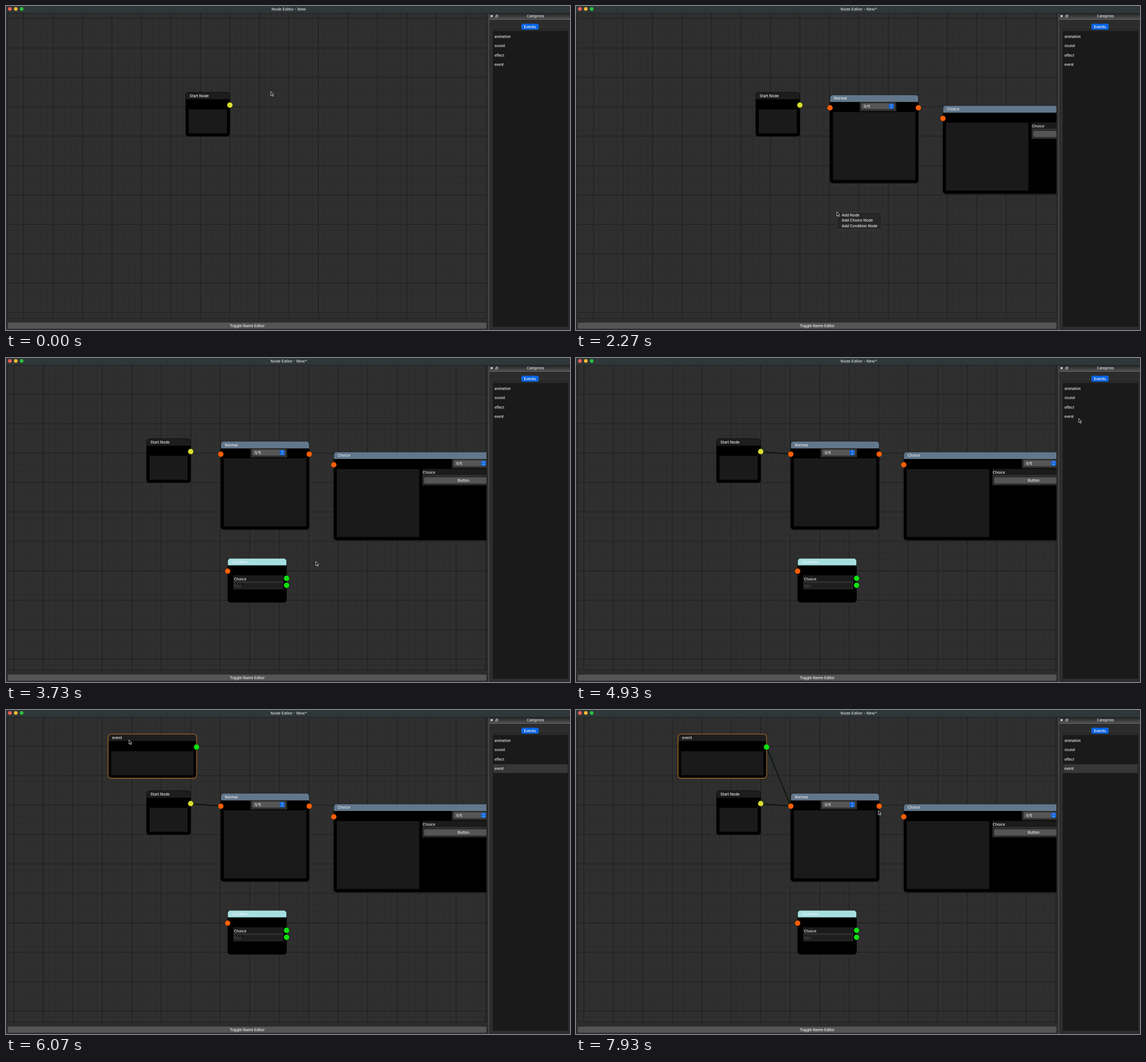
Write an HTML page with a canvas that moves like this. It is 986 by 568 pixels and loops after 8 s.

```html
<!DOCTYPE html>
<html lang="en">
<head>
<meta charset="utf-8">
<title>Node Editor</title>
<style>
  html, body { margin: 0; width: 100%; height: 100%; overflow: hidden; background: #2d2d2d; }
  canvas { display: block; width: 986px; height: 568px; }
</style>
</head>
<body>
<canvas id="stage"></canvas>
<script>
const W = 986, H = 568, LOOP = 8000;
const canvas = document.getElementById('stage');
const ctx = canvas.getContext('2d');
const dpr = window.devicePixelRatio || 1;
canvas.width = W * dpr;
canvas.height = H * dpr;

const SANS = 'Inter, "Noto Sans", sans-serif';
const HANGUL = '"Noto Sans CJK KR", "Noto Sans CJK", sans-serif';
const ORANGE = '#ff5f05', GREEN = '#0fe30f', YELLOW = '#d8df2c';
const SLATE = '#62778b', CYAN = '#a6dfe1', DARK = '#1d1d1d', FIELD = '#1a1a1a';
const MENU_ITEMS = ['Add Node', 'Add Choice Node', 'Add Condition Node'];

// Event times in ms
const T = {
  normal: 720, choice: 1560, condition: 2620,
  grab: 2940, release: 3620,
  link1: 4060, linked1: 4330,
  pick: 5230, drop: 5800, select: 5960,
  link2: 6560, linked2: 7130
};

// Rows of [time, x, y]; motion eases between them
const cursorPath = [
  [0, 463, 150], [270, 444, 156], [400, 444, 156], [600, 464, 162], [780, 464, 162],
  [1130, 641, 174.5], [1210, 641, 174.5], [1330, 662.5, 187], [1440, 668, 190], [1700, 668, 190],
  [2180, 456, 361], [2290, 456, 361], [2480, 480, 385], [2640, 480, 385],
  [2880, 657, 408], [2940, 657, 408], [3130, 629.7, 401.8], [3540, 588.5, 398], [3640, 588.5, 398],
  [3980, 323, 164], [4060, 323, 164], [4300, 375.5, 168.5], [4400, 375.5, 168.5],
  [4860, 879, 106], [5060, 879, 106], [5180, 866, 103], [5260, 866, 103],
  [5760, 178.5, 42.3], [5840, 178.5, 42.3], [6000, 215, 52.5], [6180, 215, 52.5],
  [6480, 333, 65], [6570, 333, 65], [7040, 375.5, 168.5], [7200, 375.5, 168.5],
  [7780, 528, 176], [8000, 528.5, 176.5]
];
const panPath = [[2940, 0, 0], [3130, -27.3, -6.2], [3540, -68.5, -9.8]];
const menus = [
  { x: 444, y: 156, from: 330, to: 680, rows: [[540, 0]] },
  { x: 641, y: 174.5, from: 1190, to: 1520, rows: [[1270, 0], [1390, 1]] },
  { x: 455.5, y: 360.8, from: 2230, to: 2580, rows: [[2350, 0], [2400, 1], [2440, 2]] }
];

function along(path, t) {
  if (t <= path[0][0]) return path[0].slice(1);
  for (let i = 1; i < path.length; i++) {
    const [t1, x1, y1] = path[i];
    if (t > t1) continue;
    const [t0, x0, y0] = path[i - 1];
    const u = (t - t0) / (t1 - t0), k = u * u * (3 - 2 * u);
    return [x0 + (x1 - x0) * k, y0 + (y1 - y0) * k];
  }
  return path[path.length - 1].slice(1);
}

function rect(x, y, w, h, fill, r = 0) {
  ctx.beginPath();
  ctx.roundRect(x, y, w, h, r);
  ctx.fillStyle = fill;
  ctx.fill();
}

function frame(x, y, w, h, color, width = 1, r = 0) {
  ctx.beginPath();
  ctx.roundRect(x, y, w, h, r);
  ctx.strokeStyle = color;
  ctx.lineWidth = width;
  ctx.stroke();
}

function dot(x, y, r, fill) {
  ctx.beginPath();
  ctx.arc(x, y, r, 0, Math.PI * 2);
  ctx.fillStyle = fill;
  ctx.fill();
}

function line(points, color, width) {
  ctx.beginPath();
  points.forEach(([x, y]) => ctx.lineTo(x, y));
  ctx.strokeStyle = color;
  ctx.lineWidth = width;
  ctx.stroke();
}

// y is the middle of the capitals
function text(str, x, y, { size = 6.5, weight = 500, color = '#f0f0f0', align = 'left', font = SANS } = {}) {
  ctx.font = `${weight} ${size}px ${font}`;
  ctx.textAlign = align;
  ctx.fillStyle = color;
  ctx.fillText(str, x, y + size * 0.36);
}

function gridLines(step, ox, oy, color, width) {
  ctx.beginPath();
  for (let x = ox % step; x < 842; x += step) { ctx.moveTo(x, 13); ctx.lineTo(x, 547); }
  for (let y = oy % step; y < 548; y += step) { ctx.moveTo(3, y); ctx.lineTo(840, y); }
  ctx.strokeStyle = color;
  ctx.lineWidth = width;
  ctx.stroke();
}

function socket(x, y, color) {
  dot(x, y, 5.1, 'rgba(0,0,0,.55)');
  dot(x, y, 4.7, color);
}

function nodeBox(x, y, w, h, title, color, selected) {
  rect(x, y, w, h, '#000', 5);
  rect(x, y, w, 12.3, color, [5, 5, 0, 0]);
  frame(x, y, w, h, selected ? '#b96f25' : 'rgba(0,0,0,.8)', selected ? 1.1 : 0.6, 5);
  text(title, x + 7, y + 6.2);
}

function combo(x, y) {
  rect(x, y, 64, 16.2, '#2d2d2d');
  rect(x + 3, y + 2.2, 58, 10.4, '#565656', 2.5);
  text('독백', x + 6.8, y + 7.3, { size: 6.2, weight: 400, font: HANGUL });
  rect(x + 51, y + 2.8, 8.6, 9.2, '#0b63dc', 2);
  const cx = x + 55.3, cy = y + 7.4;
  line([[cx - 1.7, cy - 1.1], [cx, cy - 2.8], [cx + 1.7, cy - 1.1]], '#fff', 0.8);
  line([[cx - 1.7, cy + 1.1], [cx, cy + 2.8], [cx + 1.7, cy + 1.1]], '#fff', 0.8);
}

function startNode(x, y) {
  nodeBox(x, y, 77.3, 77.3, 'Start Node', DARK);
  rect(x + 5.3, y + 30, 66.7, 42, FIELD);
  socket(x + 77.3, y + 22.6, YELLOW);
}

function normalNode(x, y) {
  nodeBox(x, y, 154.6, 154.6, 'Normal', SLATE);
  rect(x + 5.3, y + 30, 144, 119, FIELD);
  combo(x + 52, y + 12.3);
  socket(x, y + 22.5, ORANGE);
  socket(x + 154.6, y + 22.5, ORANGE);
}

function choiceNode(x, y) {
  nodeBox(x, y, 309, 154.6, 'Choice', SLATE);
  rect(x + 5.3, y + 30, 144, 119, FIELD);
  combo(x + 206.6, y + 12.3);
  rect(x + 155, y + 30, 149, 28.5, '#2b2b2b');
  rect(x + 155, y + 30, 149, 10.8, '#1b1b1b');
  line([[x + 155, y + 41], [x + 304, y + 41]], '#424242', 0.7);
  text('Choice', x + 155.6, y + 36);
  rect(x + 158, y + 44.5, 138, 10.6, '#555', 2);
  text('Button', x + 227, y + 49.8, { align: 'center' });
  socket(x, y + 22.5, ORANGE);
}

function conditionNode(x, y) {
  nodeBox(x, y, 103, 77.3, 'Condition', CYAN);
  rect(x + 10, y + 30, 87.5, 24.2, '#2b2b2b');
  rect(x + 10, y + 30, 87.5, 10.6, '#1b1b1b');
  rect(x + 10, y + 43, 87.5, 10, '#1e1e1e');
  line([[x + 10, y + 41.4], [x + 97.5, y + 41.4]], '#424242', 0.7);
  text('Choice', x + 11, y + 36.2);
  text('Else', x + 11, y + 48.6, { color: '#505050' });
  socket(x, y + 22.5, ORANGE);
  socket(x + 103, y + 35, GREEN);
  socket(x + 103, y + 47.3, GREEN);
}

function eventNode(x, y, selected) {
  nodeBox(x, y, 154.6, 77.3, 'event', DARK, selected);
  rect(x + 5.3, y + 30, 144, 42, FIELD);
  socket(x + 154.6, y + 22.7, GREEN);
}

function edge(from, to) {
  line([from, to], '#071407', 1.7);
}

function drawMenu({ x, y, rows }, t) {
  rect(x, y, 79, 31.4, '#262626');
  frame(x + 0.3, y + 0.3, 78.4, 30.8, '#474747', 0.7);
  const active = rows.filter(([at]) => t >= at).pop();
  if (active) rect(x + 0.6, y + 1.4 + active[1] * 9.2, 78, 9.2, '#2e72bb');
  MENU_ITEMS.forEach((item, i) => text(item, x + 9, y + 6 + i * 9.2));
}

function drawScene(t, cursor) {
  const [px, py] = along(panPath, t);
  ctx.save();
  ctx.beginPath();
  ctx.rect(3, 13, 837, 534);
  ctx.clip();
  rect(3, 13, 837, 534, '#2f2f2f');
  const ox = 30.6 + px + 515.5, oy = 22 + py + 515.5;
  gridLines(10.31, ox, oy, '#2a2a2a', 0.6);
  gridLines(51.55, ox, oy, '#212121', 1.2);

  const out1 = [391.4 + px, 173.8 + py], in1 = [444 + px, 178.4 + py], out2 = [333.1, 65];
  if (t >= T.link1) edge(out1, t < T.linked1 ? cursor : in1);
  if (t >= T.link2) edge(out2, t < T.linked2 ? cursor : in1);

  startNode(314.1 + px, 151.2 + py);
  if (t >= T.normal) normalNode(444 + px, 155.9 + py);
  if (t >= T.choice) choiceNode(641.5 + px, 174.6 + py);
  if (t >= T.condition) conditionNode(456 + px, 361 + py);
  if (t >= T.drop) eventNode(178.5, 42.3, t >= T.select);
  ctx.restore();
  frame(2.7, 12.7, 837.6, 534.6, '#202020', 0.8);
}

function drawSidebar(t) {
  rect(843, 13, 1.6, 555, '#4c4c4c');
  const shade = ctx.createLinearGradient(0, 13, 0, 23);
  shade.addColorStop(0, '#242424');
  shade.addColorStop(1, '#505050');
  rect(845, 13, 141, 10.4, shade);
  rect(845, 23.2, 141, 0.8, '#777');
  line([[847.2, 15.8], [850.8, 19.4]], '#fff', 1.2);
  line([[850.8, 15.8], [847.2, 19.4]], '#fff', 1.2);
  frame(857.2, 15.7, 2.8, 2.8, '#ddd', 0.7);
  rect(855.8, 17, 2.9, 2.9, '#333');
  frame(855.8, 17, 2.9, 2.9, '#ddd', 0.7);
  text('Categories', 925.7, 18.3, { size: 5.7, align: 'center' });

  rect(849, 37, 135.5, 527, '#292929', 2);
  frame(849.3, 37.3, 135, 526.4, '#3b3b3b', 0.7, 2);
  rect(901, 31, 30.3, 10.6, '#0a64e0', 2.5);
  text('Events', 916, 36.5, { align: 'center', color: '#fff' });
  rect(851, 44, 132, 518.5, FIELD);
  if (t >= T.pick) rect(851.5, 95, 130.5, 15.6, '#373737');
  ['animation', 'sound', 'effect', 'event'].forEach((name, i) =>
    text(name, 854, 53.6 + i * 16.5, { size: 6.1 }));
}

function drawChrome(t) {
  rect(0, 0, W, 12.3, '#2f3739');
  rect(0, 12, W, 0.8, '#1f2223');
  ['#ff5f57', '#febc2e', '#28c840'].forEach((c, i) => dot(6.8 + i * 10.3, 5.2, 3.1, c));
  const title = 'Node Editor - New' + (t >= T.normal ? '*' : '');
  text(title, 494.3, 5.2, { size: 6.8, weight: 600, color: '#c9cccd', align: 'center' });
  rect(3, 555, 837, 10.8, '#555', 2);
  text('Toggle Name Editor', 421.7, 560.2, { align: 'center' });
}

function drawArrow([x, y]) {
  const shape = [[0, 0], [0, 7.2], [1.7, 5.7], [2.9, 8.3], [4.1, 7.7], [2.9, 5.3], [5.1, 5.2]];
  ctx.beginPath();
  shape.forEach(([dx, dy]) => ctx.lineTo(x + dx, y + dy));
  ctx.closePath();
  ctx.fillStyle = '#000';
  ctx.fill();
  ctx.strokeStyle = '#e6e6e6';
  ctx.lineWidth = 0.8;
  ctx.stroke();
}

function drawFist([x, y]) {
  rect(x - 2.6, y - 1.6, 5.8, 4.4, '#fff', 1.8);
  for (let i = 0; i < 4; i++) dot(x - 1.6 + i * 1.3, y - 1.5, 0.8, '#fff');
  dot(x - 2.4, y + 0.4, 0.9, '#fff');
}

function draw(t) {
  const cursor = along(cursorPath, t);
  ctx.setTransform(dpr, 0, 0, dpr, 0, 0);
  rect(0, 0, W, H, '#2c2c2c');
  drawScene(t, cursor);
  drawSidebar(t);
  drawChrome(t);
  menus.filter(m => t >= m.from && t < m.to).forEach(m => drawMenu(m, t));
  if (t >= T.grab && t < T.release) drawFist(cursor);
  else drawArrow(cursor);
}

const began = performance.now();
function tick() {
  draw((performance.now() - began) % LOOP);
  requestAnimationFrame(tick);
}
tick();
</script>
</body>
</html>
```
